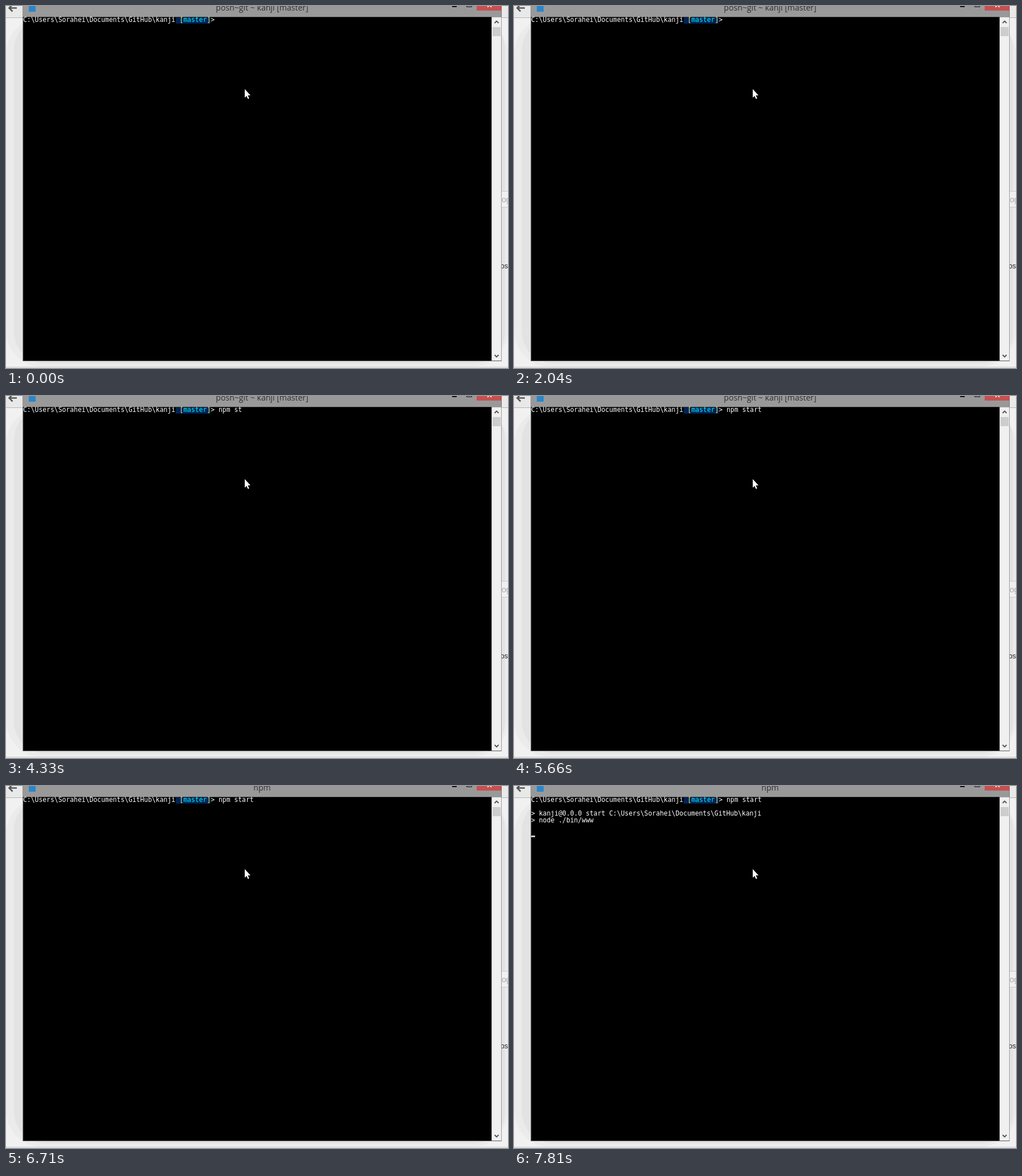
These frames come from a looping animation (881x636 px, 8000 ms). An HTML page with a canvas:

```html
<!DOCTYPE html>
<html lang="en">
<head>
<meta charset="utf-8">
<title>Terminal</title>
<style>
  html, body { margin: 0; width: 100%; height: 100%; overflow: hidden; background: #f1f1f1; }
  canvas { display: block; }
</style>
</head>
<body>
<canvas id="stage" width="881" height="636"></canvas>
<script>
const ctx = document.getElementById('stage').getContext('2d');
const LOOP = 8000;
const LEFT = 30, BASE = 28, CELL = 6.86, ROW = 11.85;
const KEY_GAP = 125, BLINK_START = 400, BLINK = 525;
const ENTER = 5920, OUTPUT = 6850, READY = 7300;
const PATH = 'C:\\Users\\Sorahei\\Documents\\GitHub\\kanji';
const PROMPT_COLS = 50;

// Keys are struck at an even pace within each burst.
const burst = (text, start) => [...text].map((char, i) => ({ char, time: start + i * KEY_GAP }));
const keys = [...burst('n', 3660), ...burst('pm ', 3660), ...burst('start', 4205)];
const resets = [0, ...keys.map(key => key.time), ENTER, READY];

// The caret toggles on every tick; a key press or new output hides it until the next one.
const ticks = t => Math.floor((t - BLINK_START) / BLINK);
function caretLit(t) {
  if (t >= OUTPUT && t < READY) return false;
  const last = Math.max(...resets.filter(time => time <= t));
  return (ticks(t) - ticks(last)) % 2 === 1;
}

function rect(x, y, w, h, color) {
  ctx.fillStyle = color;
  ctx.fillRect(x, y, w, h);
}

function rounded(x, y, w, h, r, color) {
  ctx.beginPath();
  ctx.roundRect(x, y, w, h, r);
  ctx.fillStyle = color;
  ctx.fill();
}

function stroke(path, color, width) {
  ctx.strokeStyle = color;
  ctx.lineWidth = width;
  ctx.stroke(new Path2D(path));
}

function label(text, x, y, font, color, align = 'left') {
  ctx.font = font;
  ctx.fillStyle = color;
  ctx.textAlign = align;
  ctx.fillText(text, x, y);
}

const rowY = row => Math.round(BASE + row * ROW);

function print(text, col, row, color = '#fff') {
  label(text, LEFT + col * CELL, rowY(row), '11.39px "DejaVu Sans Mono", monospace', color);
}

function drawBrowser() {
  rect(0, 0, 881, 636, '#f1f1f1');
  rounded(0, 21, 881, 613, 64, '#ebebeb');
  rounded(14, 21, 862, 607, 56, '#e3e3e3');
  rect(0, 0, 881, 20, '#e9e9e9');
  rect(0, 20, 881, 1, '#b4b4b4');
  rect(0, 634, 881, 1, '#c4c4c4');
  stroke('M19 3.5H6M11.5-2.5l-6 6 6 6', '#555', 2.6);
  rect(860, 325, 21, 29, '#c9c9c9');
  rect(860, 326, 21, 27, '#f0f0f0');
  label('og', 870, 345, '14px "Liberation Sans", sans-serif', '#aaa');
  label('os', 868, 461, '12px "Liberation Sans", sans-serif', '#222');
}

function drawWindow(title) {
  rect(29.4, 0, 840.4, 624, '#5c5c5c');
  rect(30, 0, 839, 19, '#999');
  rect(30.3, 19.5, 822, 603.5, '#000');
  label(title, 449.5, 8, '14.1px "Open Sans", sans-serif', '#303030', 'center');
  rect(40, 0, 12, 10, '#2b86c9');
  rect(783, 0, 8, 2, '#111');
  stroke('M808.5 0v1.5h9V0', '#111', 1);
  rect(826, 0, 44, 8, '#c75050');
  stroke('M845 2l3.5-3.5 3.5 3.5', '#fff', 1.6);

  rect(852.3, 19.5, 17, 603.5, '#f0f0f0');
  rect(854, 37, 14, 16, '#cdcdcd');
  stroke('M857.5 30l3.5-3.5 3.5 3.5', '#505050', 1.8);
  stroke('M857.5 613l3.5 3.5 3.5-3.5', '#505050', 1.8);
}

function drawTerminal(t) {
  print(PATH, 0, 0);
  rect(298, 20, 61, 11, '#012456');
  print('[', 40, 0, '#f5f06a');
  print('master', 41, 0, '#00f4ff');
  print(']', 47, 0, '#f5f06a');
  print('>', 48, 0);

  const command = keys.filter(key => key.time <= t).map(key => key.char).join('');
  print(command, PROMPT_COLS, 0);
  if (t >= OUTPUT) {
    print('> kanji@0.0.0 start ' + PATH, 0, 2);
    print('> node ./bin/www', 0, 3);
  }
  if (caretLit(t)) {
    const row = t < ENTER ? 0 : t < OUTPUT ? 1 : 5;
    const col = row ? 0 : PROMPT_COLS + command.length;
    rect(Math.round(LEFT + col * CELL), rowY(row), 7, 3, '#c8c8c8');
  }
}

function drawPointer() {
  ctx.fillStyle = '#fff';
  ctx.fill(new Path2D('M419 146v15l3.3-3.1 2.3 5.4 2.1-.9-2.3-5.4h4.6z'));
}

function draw(t) {
  drawBrowser();
  drawWindow(t < ENTER ? 'posh~git ~ kanji [master]' : 'npm');
  drawTerminal(t);
  drawPointer();
}

const start = performance.now();
function tick() {
  draw((performance.now() - start) % LOOP);
  requestAnimationFrame(tick);
}
tick();
</script>
</body>
</html>
```
